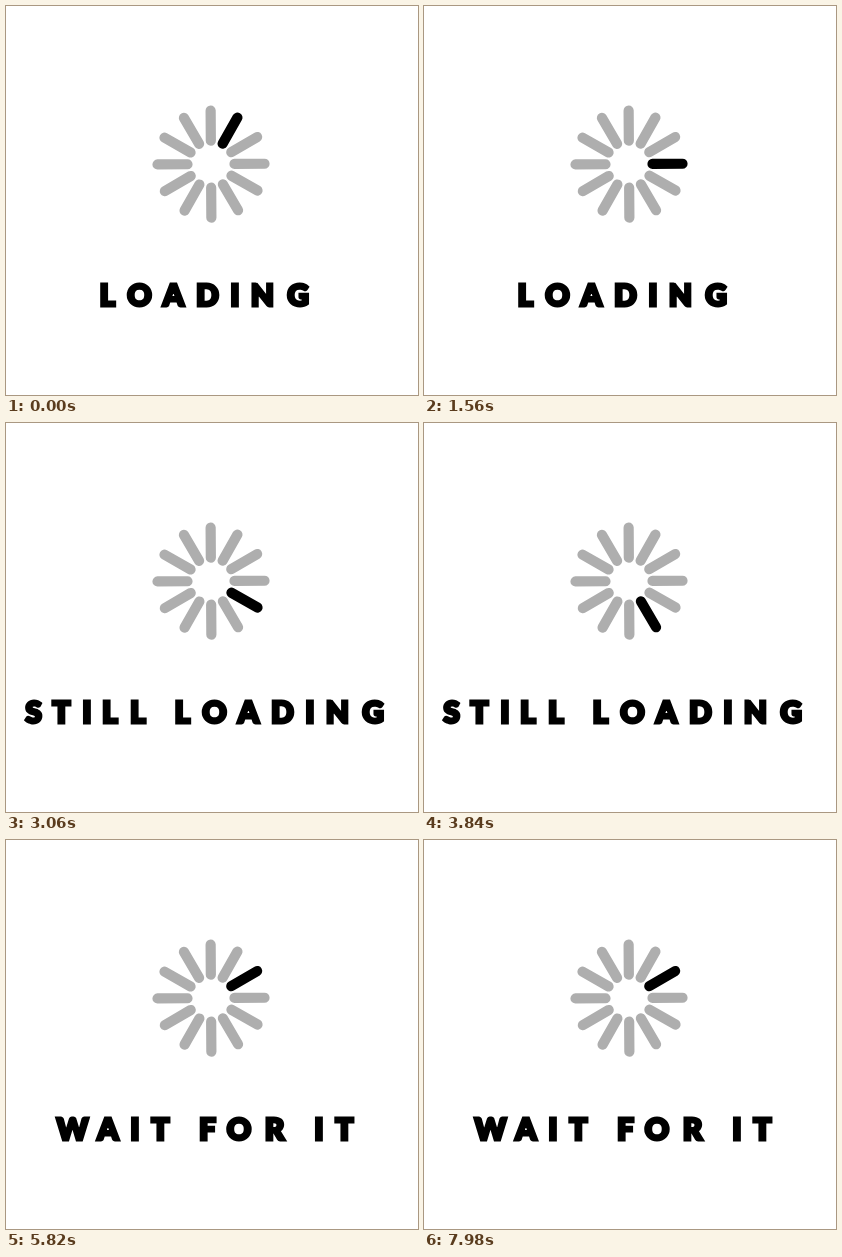
These frames come from a looping animation (412x389 px, 8000 ms). An HTML page:

```html
<!DOCTYPE html>
<html lang="en">
<head>
<meta charset="utf-8">
<title>Loading</title>
<style>
  html, body { margin: 0; width: 100%; height: 100%; overflow: hidden; background: #fff; }
  svg { display: block; width: 100%; height: 100%; }
  line { stroke: #aeaeae; stroke-width: 10.2; stroke-linecap: round; }
  line.active { stroke: #000; }
  text {
    font: 900 30px Lato, sans-serif;
    text-anchor: middle;
    stroke: #000;
    stroke-width: 2.8;
  }
</style>
</head>
<body>
<svg viewBox="0 0 412 389">
  <g id="spinner" transform="translate(205 158.1) rotate(-0.4)"></g>
  <text id="caption" y="300.2"></text>
</svg>
<script>
const LOOP = 8000, STEP = 60, SPOKES = 12;
const STEPS_PER_CAPTION = 4 * SPOKES;

// Each caption has the centre of every character, spaces included.
const loadingX = [101.5, 133.5, 167.5, 201.5, 229, 256.5, 292];
const captions = [
  { text: "LOADING", x: loadingX },
  { text: "STILL LOADING", x: [27.5, 55.5, 81, 104, 132, 152, ...loadingX.map(x => x + 75)] },
  { text: "WAIT FOR IT", x: [66.5, 102, 129, 154.5, 180, 201.5, 233, 268.5, 295, 313, 338.5] }
];

const spinner = document.getElementById("spinner");
const caption = document.getElementById("caption");

const spokes = Array.from({ length: SPOKES }, (_, i) => {
  const spoke = document.createElementNS("http://www.w3.org/2000/svg", "line");
  spoke.setAttribute("y1", -23.5);
  spoke.setAttribute("y2", -53.5);
  spoke.setAttribute("transform", `rotate(${i * 360 / SPOKES})`);
  return spinner.appendChild(spoke);
});

function render(time) {
  const step = Math.floor((time % LOOP) / STEP);
  const active = (step + 1) % SPOKES;
  spokes.forEach((spoke, i) => spoke.classList.toggle("active", i === active));

  const { text, x } = captions[Math.floor(step / STEPS_PER_CAPTION)];
  if (caption.textContent !== text) {
    caption.textContent = text;
    caption.setAttribute("x", x.join(" "));
  }
}

const start = performance.now();
function tick() {
  render(performance.now() - start);
  requestAnimationFrame(tick);
}
tick();
</script>
</body>
</html>
```
